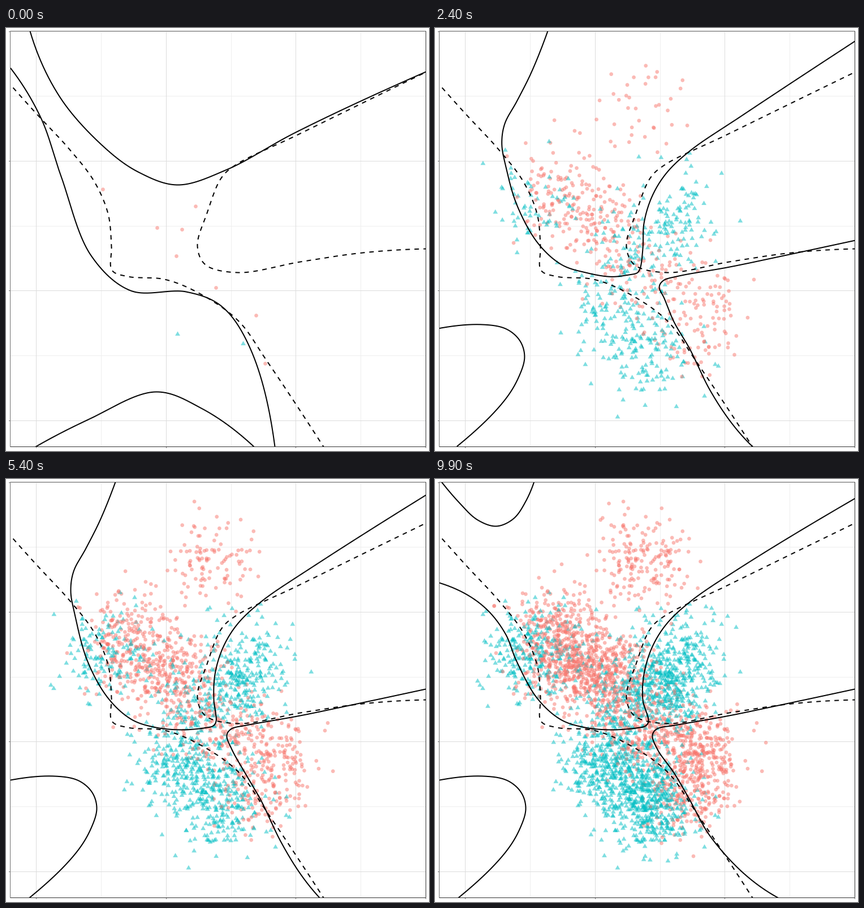
Animation of 748 by 748 pixels, one loop 10 s. Source, as a matplotlib script:

```python
import matplotlib.pyplot as plt
import numpy as np
from matplotlib.animation import FuncAnimation
from matplotlib.collections import PathCollection
from matplotlib.patches import Rectangle
from matplotlib.path import Path

SIZE, DPI = 748, 100
FRAMES, GROWTH = 100, 37
SPLIT = 60
LEFT, RIGHT, TOP, BOTTOM = 7, 742, 5, 740
RED, TEAL = (0.973, 0.463, 0.427, 0.5), (0.0, 0.749, 0.769, 0.5)
PX = 72 / DPI
rng = np.random.default_rng(4)

# Cluster centres with weights
RED_MEANS = [(370, 145, 6.5), (215, 270, 10), (250, 335, 12), (310, 340, 10),
             (345, 420, 6), (385, 450, 5), (465, 475, 10), (450, 560, 6)]
TEAL_MEANS = [(165, 312, 8), (225, 310, 2), (430, 325, 9), (400, 375, 9),
              (335, 385, 5), (300, 500, 11), (360, 530, 8), (385, 585, 11)]
FIRST = [(171, 285), (335, 315), (267, 353), (311, 356), (301, 403),
         (371, 459), (442, 508), (458, 593), (303, 541), (419, 558)]

# Boundary fitted to the first ten points
START = [
    [(42, 5), (95, 122), (175, 212), (235, 255), (303, 277), (390, 250),
     (512, 184), (742, 77)],
    [(8, 71), (61, 158), (97, 262), (150, 402), (220, 464), (318, 466),
     (380, 491), (430, 563), (475, 740)],
    [(52, 740), (145, 692), (264, 643), (345, 672), (438, 740)],
]
# Fixed dashed boundary
DASHED = [
    [(12, 105), (56, 154), (110, 212), (155, 270), (180, 328), (186, 385),
     (187, 428), (215, 439), (280, 444), (340, 468), (410, 517), (460, 587),
     (561, 740)],
    [(737, 80), (620, 137), (512, 190), (405, 242), (380, 265), (355, 327),
     (338, 385), (352, 418), (410, 432), (520, 413), (630, 397), (742, 390)],
]
# How the fitted boundary drifts while points arrive
STEPS = [15, 34, 54, 66, 83, 99]
BOWL_TIP = [359, 366, 371, 374, 371, 377]
WEDGE_TIP = [398, 394, 390, 391, 389, 384]
WEDGE_FOOT = [575, 546, 554, 608, 590, 606]
UPPER_END = [22, 24, 28, 36, 32, 34]


def curve(points, n=400):
    """Smooth centripetal spline through the points."""
    p = np.asarray(points, float)
    gaps = np.sqrt(np.hypot(*np.diff(p, axis=0).T))
    t = np.concatenate([[0], np.cumsum(gaps)])
    m = np.gradient(p, t, axis=0, edge_order=2)
    u = np.linspace(0, t[-1], n)
    i = np.clip(np.searchsorted(t, u, side="right") - 1, 0, len(p) - 2)
    h = (t[i + 1] - t[i])[:, None]
    s = (u - t[i])[:, None] / h
    q = (p[i] * (1 + 2 * s) * (1 - s) ** 2 + p[i + 1] * s**2 * (3 - 2 * s)
         + h * m[i] * s * (1 - s) ** 2 - h * m[i + 1] * s**2 * (1 - s))
    return q.T


def shift(points, amount, dx, dy):
    return [(x + amount * dx, y + amount * dy) for x, y in points]


def bowl(tip, end, early):
    """Floor and right wall of the upper region."""
    floor = [(143, 320), (180, 387), (222, 425), (265, 439)]
    rim = [(310, 443), (tip - 22, 440), (tip - 5, 436), (tip, 428)]
    wall = [(367, 390), (369, 345), (383, 298), (408, 257), (450, 217),
            (540, 156), (RIGHT, end)]
    return shift(floor, early, 3, -13) + shift(rim, early, 0, -7) + wall


def wedge(tip, foot, early):
    """Pointed region at the lower right."""
    arm = [(RIGHT, 371), (630, 395), (520, 418), (430, 434), (tip + 7, 442),
           (tip, 453)]
    leg = [(tip + 9, 478), (422, 519), (450, 567),
           (485, 640 - 0.2 * (foot - 554)), ((485 + foot) / 2, 697),
           (foot, BOTTOM)]
    return shift(arm, early, 0, 8) + leg


def boundary(k):
    if k == 0:
        return START
    tip, point, foot, end = (np.interp(k, STEPS, v) for v in
                             (BOWL_TIP, WEDGE_TIP, WEDGE_FOOT, UPPER_END))
    early = np.interp(k, [15, 34], [1, 0])
    loop = [(2, 533), (85, 525), (128, 533), (152, 554), (160, 582),
            (150, 617), (123, 661), (41, 740)]
    base = bowl(tip, end, early)
    rest = [wedge(point, foot, early), shift(loop, early, -4, -2)]
    if k < SPLIT:
        neck = [(199, -12), (167, 70), (141, 122), (119, 163), (114, 198),
                (121, 238)]
        return [shift(neck, early, 7, 12) + base] + rest
    pull = np.sin(np.pi * np.interp(k, [66, 99], [0, 1]))
    shore = [(0, 181), (56, 204), (95, 234), (125, 275)]
    bay = [(-4, -15), (42, 41), (75, 72), (108, 83), (138, 70), (160, 39),
           (178, -6)]
    bay = shift(bay[:4], pull, -12, 23) + shift(bay[4:], pull, 4, 20)
    return [shift(shore, pull, -5, -19) + base, bay] + rest


def count(k):
    return len(FIRST) + GROWTH * k


def sample(n):
    means = np.array(RED_MEANS + TEAL_MEANS, float)
    pick = rng.choice(len(means), n, p=means[:, 2] / means[:, 2].sum())
    radius = 40 * np.minimum(np.sqrt(rng.chisquare(2, n)), 3)
    angle = rng.uniform(0, 2 * np.pi, n)
    spread = radius[:, None] * np.column_stack([np.cos(angle), np.sin(angle)])
    pts, teal = means[pick, :2] + spread, pick >= len(RED_MEANS)
    pts[:10] = FIRST
    teal[:10] = np.arange(10) >= 8
    return pts, teal


def regular(sides, radius):
    a = np.pi / 2 + np.arange(sides + 1) * 2 * np.pi / sides
    return Path(np.column_stack([np.cos(a), np.sin(a)]) * radius / DPI, closed=True)


fig = plt.figure(figsize=(SIZE / DPI, SIZE / DPI), dpi=DPI, facecolor="white")
ax = fig.add_axes([0, 0, 1, 1])
# Whole numbers fall on pixel centres
ax.set(xlim=(-0.5, SIZE - 0.5), ylim=(SIZE - 0.5, -0.5))
ax.axis("off")
panel = Rectangle((LEFT, TOP), RIGHT - LEFT, BOTTOM - TOP, fc="none", ec="none")
ax.add_patch(panel)


def rule(xs, ys, color, z=1):
    ax.plot(xs, ys, color=color, lw=PX, zorder=z, solid_capstyle="butt", snap=False)


for i in range(7):
    x, y = round(53.4 + 114.75 * i), round(5.5 + 114.7 * i)
    major = i % 2 == 0
    shade = "#dcdcdc" if major else "#eeeeee"
    if x < RIGHT:
        rule([x, x], [TOP, BOTTOM], shade, 1 + major / 2)
    rule([LEFT, RIGHT], [y, y], shade, 1 + major / 2)
    if major:
        x = min(x, RIGHT)
        rule([x, x], [BOTTOM, BOTTOM + 2.5], "#777777")
        rule([LEFT - 2.5, LEFT], [y, y], "#777777")
rule([LEFT, LEFT], [TOP, BOTTOM], "#707070", 6)
rule([LEFT, RIGHT], [TOP, TOP], "#707070", 6)
rule([RIGHT, RIGHT], [TOP, BOTTOM], "#333333", 6)
rule([LEFT, RIGHT], [BOTTOM, BOTTOM], "#333333", 6)

pts, teal = sample(count(FRAMES))
dot, tri = regular(12, 3.4), regular(3, 5.1)
shapes = [tri if t else dot for t in teal]
cloud = PathCollection(shapes, offsets=pts, offset_transform=ax.transData,
                       transform=fig.dpi_scale_trans, linewidths=0,
                       facecolors=[TEAL if t else RED for t in teal], zorder=3)
ax.add_collection(cloud, autolim=False)


def stroke(points=None, **style):
    xy = curve(points) if points else ([], [])
    line, = ax.plot(*xy, color="black", lw=2 * PX, zorder=5, **style)
    line.set_clip_path(panel)
    return line


for branch in DASHED:
    stroke(branch, ls=(0, (4, 4)), dash_capstyle="butt")
lines = [stroke() for _ in range(4)]


def draw(k):
    n = count(k)
    cloud.set_paths(shapes[:n])
    cloud.set_offsets(pts[:n])
    branches = boundary(k)
    for i, line in enumerate(lines):
        line.set_data(*(curve(branches[i]) if i < len(branches) else ([], [])))
    return [cloud, *lines]


anim = FuncAnimation(fig, draw, frames=FRAMES, interval=100, repeat=True)
plt.show()
```
